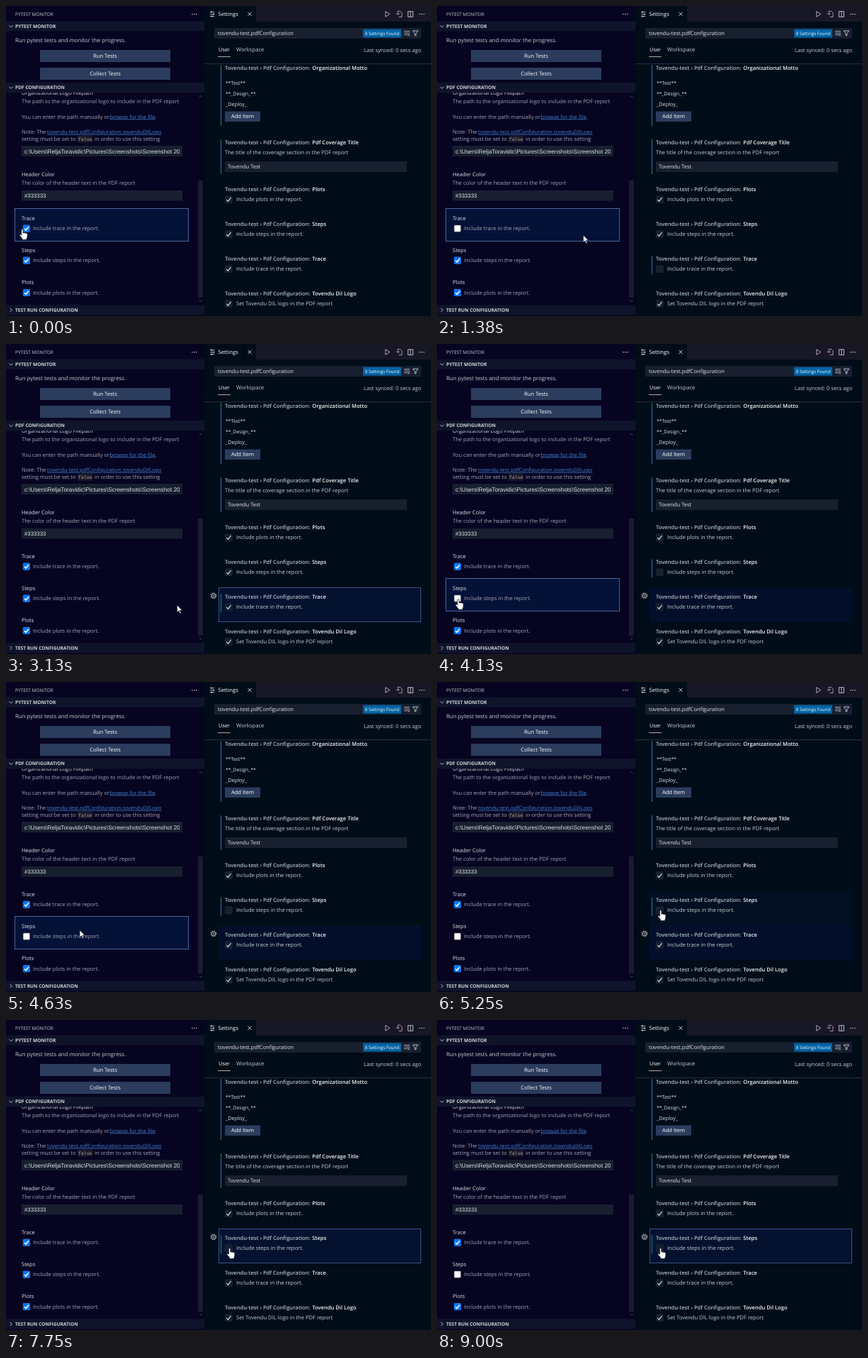
An HTML page for the animation above (9130 ms loop, 600 px wide and 437 px high).

```html
<!DOCTYPE html>
<html lang="en">
<head>
<meta charset="utf-8">
<title>Settings sync</title>
<style>
html, body { margin: 0; width: 100%; height: 100%; overflow: hidden; background: #000c18; }
svg { display: block; width: 100%; height: 100%; }
text { font-family: "Open Sans", "Noto Sans", sans-serif; text-rendering: geometricPrecision; white-space: pre; }
.arial { font-family: "Liberation Sans", Arial, sans-serif; }
.mono { font-family: "Liberation Mono", monospace; }
</style>
</head>
<body>
<svg id="stage" viewBox="0 0 600 437"></svg>
<script>
const LOOP = 9130, STEP = 125, SIZE = 7.58;
const BRIGHT = '#e2e4e9', SOFT = '#cbced5', DIM = '#a3a5b4', LINK = '#4080d0', BAR = '#1d667e', FIELD = '#181f2f';
const stage = document.getElementById('stage');

function el(tag, attrs, parent = stage) {
  const node = document.createElementNS('http://www.w3.org/2000/svg', tag);
  for (const key in attrs) node.setAttribute(key, attrs[key]);
  parent.appendChild(node);
  return node;
}
const rect = (x, y, width, height, fill, more, parent) =>
  el('rect', { x, y, width, height, fill, ...more }, parent);
const line = (d, stroke, width = 1, parent) =>
  el('path', { d, fill: 'none', stroke, 'stroke-width': width }, parent);
function text(x, y, str, fill = SOFT, more = {}) {
  const node = el('text', { x, y, fill, 'font-size': SIZE, ...more });
  node.textContent = str;
  return node;
}
const group = parent => el('g', {}, parent);
const show = (node, on) => node.setAttribute('visibility', on ? 'inherit' : 'hidden');

// Backgrounds
rect(0, 0, 280, 437, '#060421');
rect(280, 0, 320, 437, '#000c18');
rect(280, 0, 320, 22, '#171725');
rect(280, 0, 73, 22, '#000c18');

// Left panel
const leftFocus = rect(12.5, 285.5, 245, 46, '#051238', { stroke: '#4a639a', 'stroke-width': 1 });
text(22, 125, 'Organizational Logo Filepath', BRIGHT);
text(22, 137.2, 'The path to the organizational logo to include in the PDF report', DIM);
text(22, 158.5, 'You can enter the path manually or ', DIM);
text(146.5, 158.5, 'browse for the file', LINK, { 'text-decoration': 'underline' });
text(210.5, 158.5, '.', DIM);
text(22, 179.8, 'Note: The', DIM);
text(58, 179.8, 'tovendu-test.pdfConfiguration.tovenduDilLogo', LINK, { 'text-decoration': 'underline', 'font-size': 7.45 });
text(22, 190, 'setting must be set to', DIM);
rect(100.5, 182.5, 22, 10, '#1a1a2b', { rx: 1.5 });
text(102, 189.6, 'false', '#b5a698', { class: 'mono', 'font-size': 6.5 });
text(125, 190, 'in order to use this setting', DIM);

rect(22, 197, 227, 15, FIELD);
const clip = el('clipPath', { id: 'field' });
rect(22, 197, 223, 15, '#fff', {}, clip);
text(26, 207.5, 'c:\\Users\\ReljaToravidic\\Pictures\\Screenshots\\Screenshot 202', BRIGHT,
  { class: 'arial', 'font-size': 8.25, 'clip-path': 'url(#field)' });
text(22, 239.6, 'Header Color', BRIGHT);
text(22, 252.2, 'The color of the header text in the PDF report', DIM);
rect(22, 260, 227, 14.5, FIELD);
text(26, 270, '#333333', BRIGHT, { class: 'arial', 'font-size': 7.8 });

function leftOption(y, name) {
  text(22, y + 2.7, name, BRIGHT);
  text(38, y + 17.2, `Include ${name.toLowerCase()} in the report.`, DIM);
  rect(24.3, y + 10, 9.2, 9.2, '#fff', { rx: 1.3, stroke: '#767676', 'stroke-width': .6 });
  const on = group();
  rect(24, y + 9.7, 9.8, 9.8, '#0075ff', { rx: 1.5 }, on);
  line(`M26 ${y + 14.8}l2.1 2.2 3.9-4.7`, '#fff', 1.5, on);
  return on;
}
const leftTrace = leftOption(299, 'Trace');
const leftSteps = leftOption(344, 'Steps');
leftOption(389.5, 'Plots');
rect(271, 246, 7, 165, '#1c1b33');
line('M273 128.5l1.7-1.9 1.7 1.9M273 414.5l1.7 1.9 1.7-1.9', '#5a5a72', .8);

function section(y, height, name, open) {
  rect(0, y, 280, height, '#10142b');
  const mid = y + 7;
  line(open ? `M4.5 ${mid - 1.2}l2.6 2.6 2.6-2.6` : `M5.7 ${mid - 2.6}l2.6 2.6-2.6 2.6`, SOFT, .9);
  text(13, mid + 2.4, name, '#d2d5da', { 'font-size': 6.62, 'font-weight': 700 });
}
text(13, 13.5, 'PYTEST MONITOR', SOFT, { 'font-size': 6.5 });
section(21.5, 14, 'PYTEST MONITOR', true);
section(108, 14.2, 'PDF CONFIGURATION', true);
section(421.5, 14, 'TEST RUN CONFIGURATION', false);
text(13, 51.2, 'Run pytest tests and monitor the progress.', SOFT, { 'font-size': 7.87 });
for (const [y, name] of [[62, 'Run Tests'], [87, 'Collect Tests']]) {
  rect(48, y, 184, 17, '#2b3c5d');
  text(140, y + 11.3, name, '#fff', { 'text-anchor': 'middle' });
}
function dots(x) {
  for (let i = -1; i < 2; i++) el('circle', { cx: x + i * 3, cy: 11.5, r: .8, fill: SOFT });
}
dots(266);

// Tab bar
line('M288 8.5h6.5M288 11.5h6.5M288 14.5h6.5', SOFT, .8);
line('M290 7.2v2.6M293 10.2v2.6M290.5 13.2v2.6', SOFT, 1.2);
text(299.5, 14, 'Settings', '#fff', { 'font-size': 7.65 });
line('M341.5 8.8l5 5m0-5l-5 5', BRIGHT, .9);
line('M535.8 7.6v7.6l6-3.8z', '#c3b3cf', .9);
line('M553 9v-1.7h3.5l2.5 2.5v5.6h-4.5M550.6 11h4.4m-1.8-1.8l1.8 1.8-1.8 1.8', '#c99ad0', .9);
line('M567.5 7.7h7v7.6h-7zM571 7.7v7.6', SOFT, .9);
dots(587);

// Search and scope header
rect(294, 31, 292, 15, FIELD);
text(299, 41.3, 'tovendu-test.pdfConfiguration', BRIGHT);
rect(504, 32.5, 54, 12, '#0063a5', { rx: 1 });
text(531, 40.8, '8 Settings Found', '#fff', { 'font-size': 6.25, 'text-anchor': 'middle' });
line('M562 35.5h8M562 38h8M562 40.5h4.5M567 39.3l3 3m0-3l-3 3', SOFT, .8);
line('M574.3 35h7.4l-2.8 3.6v3l-1.8 0v-3z', SOFT, .9);
text(300, 64.4, 'User', '#fff', { 'font-size': 7.4 });
text(325, 64.4, 'Workspace', SOFT, { 'font-size': 7.7 });
text(586.3, 64.6, 'Last synced: 0 secs ago', SOFT, { 'text-anchor': 'end' });
line('M299 71.5h18', '#b9a493', 1);
line('M280 81.5h320', '#26303f', 1);

// Settings rows
function gear(y) {
  const g = group();
  el('circle', { cx: 293, cy: y, r: 2.9, fill: 'none', stroke: '#a4a8b0', 'stroke-width': 1 }, g);
  el('circle', { cx: 293, cy: y, r: 3.8, fill: 'none', stroke: '#a4a8b0', 'stroke-width': 1.3, 'stroke-dasharray': '1.49 1.49' }, g);
  el('circle', { cx: 293, cy: y, r: 1.1, fill: 'none', stroke: '#a4a8b0', 'stroke-width': .8 }, g);
  return g;
}
const bar = (y, height) => rect(302.8, y, 1.4, height, BAR);
function heading(y, name) {
  const label = text(309, y + 2.6, '', '#b6bcc6', { 'font-weight': 600 });
  label.textContent = 'Tovendu-test › Pdf Configuration: ';
  el('tspan', { fill: '#f4f6f8', dx: 1 }, label).textContent = name;
}
function rightOption(y, name, note) {
  const row = {
    box: rect(300.5, y - 13, 285, 48, 'none', { 'stroke-width': 1 }),
    bar: bar(y - 4, 26),
    gear: gear(y - 1.7)
  };
  heading(y, name);
  rect(309.3, y + 9.2, 10, 10, FIELD, { rx: 1, stroke: '#232c3e', 'stroke-width': .6 });
  row.check = line(`M311.3 ${y + 14.6}l2.2 2.3 4-5.2`, '#e2e5ea', 1.1);
  text(325, y + 16.8, note);
  return row;
}
bar(83, 86);
heading(87, 'Organizational Motto');
text(310, 110.6, '**Test**', BRIGHT, { 'font-size': 6.9 });
text(310, 125.9, '**_Design_**', BRIGHT, { 'font-size': 6.8 });
text(310, 140.6, '_Deploy_', BRIGHT, { 'font-size': 7.3 });
rect(309, 148.5, 50, 14.5, '#2b3c5d');
text(334, 158.4, 'Add Item', '#fff', { 'text-anchor': 'middle', 'font-weight': 500 });
bar(188, 49);
heading(192.3, 'Pdf Coverage Title');
text(309, 209.1, 'The title of the coverage section in the PDF report');
rect(309, 219, 257, 15, FIELD);
text(313, 229.3, 'Tovendu Test', BRIGHT);

const include = name => `Include ${name} in the report.`;
const plots = rightOption(258.5, 'Plots', include('plots'));
const steps = rightOption(307.5, 'Steps', include('steps'));
const trace = rightOption(356.5, 'Trace', include('trace'));
const logo = rightOption(405.5, 'Tovendu Dil Logo', 'Set Tovendu DIL logo in the PDF report');

// Row looks: fill, border
const LOOKS = {
  plain: ['none', 'none'],
  hover: ['#020f22', '#020f22'],
  idle: ['#030f2a', '#030f2a'],
  focus: ['#04122f', '#3a5288']
};
function setRow(row, look, checked, marked, geared) {
  row.box.setAttribute('fill', LOOKS[look][0]);
  row.box.setAttribute('stroke', LOOKS[look][1]);
  show(row.check, checked);
  show(row.bar, marked);
  show(row.gear, geared);
}
setRow(plots, 'plain', true, false, false);
setRow(logo, 'plain', true, false, false);

// Pointers, tip at 0,0
const pointer = group();
const ink = { fill: '#fff', stroke: '#10131c', 'stroke-width': .7, 'stroke-linejoin': 'round' };
const arrow = el('path', { ...ink, d: 'M0 0v10.3l2.4-2.2 1.7 3.8 1.6-.7-1.7-3.7h3.3z' }, pointer);
const hand = el('path', { ...ink, transform: 'scale(1.08)',
  d: 'M-1.1.9q1.1-1.8 2.2 0v4.2q1-.9 2 .1 1-.7 1.9.3 1.4-.5 1.7 1v3q0 1.5-1 2.7v1.6h-5.8v-1.4l-3.4-4.3q-.4-1.6 1-1.4l1.4 1.4z' }, pointer);

// Pointer stops: step, x, y, easing into the stop
const easeIn = u => u * u, easeOut = u => u * (2 - u), smooth = u => u * u * (3 - 2 * u);
const PATH = [
  [0, 23, 314.5, smooth], [7, 23, 314.5, smooth], [11, 206.5, 323, easeIn], [15, 315.5, 371, easeOut],
  [23, 315.5, 371, smooth], [29, 30, 359.5, smooth], [35, 30, 359.5, smooth], [41, 315.7, 321.7, smooth], [74, 315.7, 321.7, smooth]
];
function pointerAt(n) {
  const i = PATH.findIndex((stop, k) => k && n <= stop[0]);
  const [n0, x0, y0] = PATH[i - 1], [n1, x1, y1, ease] = PATH[i];
  const u = ease((n - n0) / (n1 - n0));
  return { x: x0 + (x1 - x0) * u, y: y0 + (y1 - y0) * u };
}

function draw(ms) {
  const n = Math.floor((ms + 5) / STEP);
  const within = (a, b) => n >= a && n < b;

  const onTrace = within(0, 19), onSteps = within(30, 41);
  show(leftFocus, onTrace || onSteps);
  leftFocus.setAttribute('y', onTrace ? 285.5 : 330.5);
  show(leftTrace, !within(4, 20));
  show(leftSteps, !within(30, 44) && n < 63);

  const traceLook = within(15, 19) ? 'hover' : within(19, 30) ? 'focus' : within(30, 43) ? 'idle' : 'plain';
  setRow(trace, traceLook, !within(6, 19), within(6, 30), within(15, 43));
  const stepsLook = within(41, 43) ? 'hover' : n >= 43 ? 'focus' : 'plain';
  setRow(steps, stepsLook, !within(32, 43) && n < 62, n >= 32, n >= 43);

  const { x, y } = pointerAt(n);
  const overBox = n <= 7 || within(15, 24) || within(29, 36) || n >= 41;
  pointer.setAttribute('transform', `translate(${x.toFixed(2)} ${y.toFixed(2)})`);
  show(hand, overBox);
  show(arrow, !overBox);
}

const start = performance.now();
function tick() {
  draw((performance.now() - start) % LOOP);
  requestAnimationFrame(tick);
}
tick();
</script>
</body>
</html>
```
